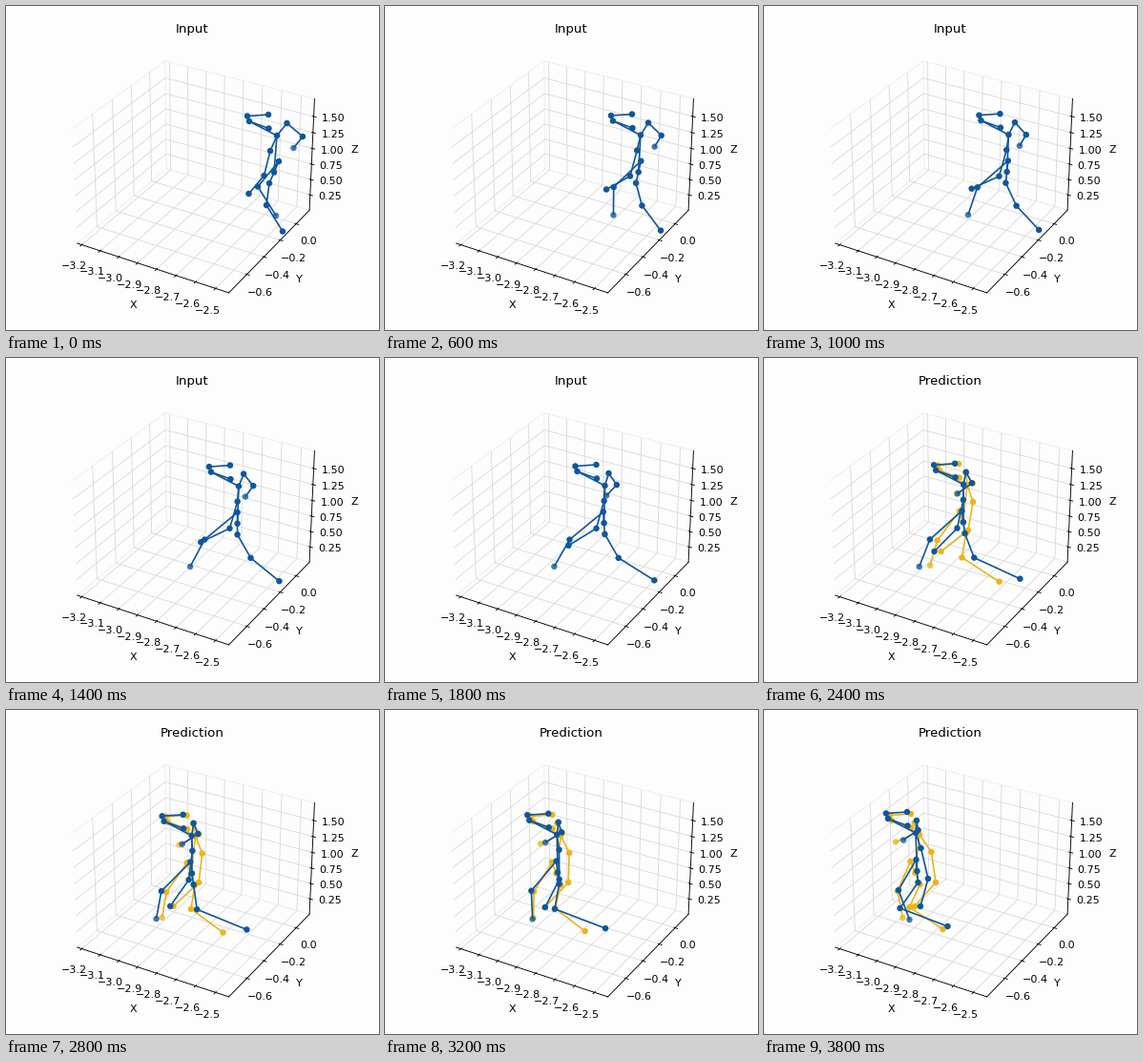
These frames come from a looping animation (391 px wide and 340 px high, 4000 ms). A matplotlib script:

```python
import numpy as np
import matplotlib.pyplot as plt
from matplotlib.animation import FuncAnimation
from matplotlib.collections import LineCollection
from matplotlib.colors import to_rgba

W, H, DPI = 391, 340, 80
FRAMES, STEP = 20, 200
PAPER, BLUE, YELLOW = "#fdfdfd", "#10569c", "#ebb51a"
SWITCH, LAST = 2000, 3800          # first predicted pose, last pose (ms)
MISS_FROM = 2200                   # reference time of the prediction error


def arc(u, start, end, swing=0, lag=0):
    """Straight drift plus one stride of swing; lag skews its timing."""
    return (start + (end - start) * u
            + swing * np.sin(np.pi * u) + lag * np.sin(2 * np.pi * u))


# Stage points are complex numbers in pixels, y pointing down.
# Each motion is a set of arc() arguments, followed by the prediction's error.
NECK = (284 + 136j, 159 + 129j, 5.5 + 1.3j, 1.3), (4, 4 + 2j)
HEAD = {"chin": -29 - 15j, "brow": -31 - 20.5j,
        "crown": -9 - 22j, "nape": -8.5 - 7.5j}
PELVIS = (-3 + 38.5j, 1.5 + 40j), (-4.5, -6)
HIP_TILT = (5 - 11.5j, -1 - 12j, -3), (-1.5, -4)
LIMBS = {  # relative to the neck
    "r_shoulder": ((10.5 - 13j, 1 - 13j, -2), (-4, -6)),
    "r_elbow": ((27 + 1j, 2.5 - 3j, -3), (-3, -4)),
    "r_hand": ((17.5 + 13j, -13 + 7.5j, -2, 3.5), (-4, -12)),
    "l_shoulder": ((-7 + 16j, 5.5 + 16j, 0, 1.5), (6 + 2j, 7 + 2j)),
    "l_elbow": ((-13.5 + 42j, 13 + 48j, -8.5, 2.8), (8 + 2j, 4 + 2j)),
    "l_hand": ((-29.5 + 61j, 5 + 77j, -25 - 5j, -5j), (5, -10 - 2j)),
    "l_knee": ((-11 + 73j, -16.5 + 79j, 28), (-20, 6 - 3j)),
    "l_foot": ((6 + 100.5j, 33.5 + 98j, 34, -6.5), (-23 + 3j, -9 + 1j, -12)),
    "r_knee": ((-20 + 53.5j, -18 + 60j, -18), (5 + 1j, -5 - 1j)),
    "r_foot": ((-1 + 84j, -6.5 + 91j, -49 - 2.5j, -4), (10 - 1j, -11 - 4j)),
}
CHAINS = (
    ("neck", "chin", "brow", "crown"),
    ("chin", "nape"),
    ("neck", "r_shoulder", "r_elbow", "r_hand"),
    ("neck", "l_shoulder", "l_elbow", "l_hand"),
    ("neck", "pelvis"),
    ("pelvis", "r_hip", "r_knee", "r_foot"),
    ("pelvis", "l_hip", "l_knee", "l_foot"),
)
NAMES = list(dict.fromkeys(name for chain in CHAINS for name in chain))
FAINT = {"r_foot", "r_hand"}       # far side of the body


def pose(t, predicted):
    u, v = t / LAST, (t - MISS_FROM) / (LAST - MISS_FROM)

    def place(track):
        motion, miss = track
        return arc(u, *motion) + (arc(v, *miss) if predicted else 0)

    neck = place(NECK)
    pelvis, tilt = neck + place(PELVIS), place(HIP_TILT)
    pts = {"neck": neck, "pelvis": pelvis,
           "r_hip": pelvis + tilt, "l_hip": pelvis - tilt}
    pts.update((name, neck + offset) for name, offset in HEAD.items())
    pts.update((name, neck + place(track)) for name, track in LIMBS.items())
    return {name: (p.real, p.imag) for name, p in pts.items()}


class Skeleton:
    def __init__(self, ax, color, predicted, z):
        self.predicted = predicted
        self.bones = LineCollection([], colors=color, linewidths=1.5, zorder=z)
        ax.add_collection(self.bones, autolim=False)
        tints = [to_rgba(color, 0.78 if n in FAINT else 1) for n in NAMES]
        self.dots = ax.scatter([0] * len(NAMES), [0] * len(NAMES), s=34,
                               c=tints, linewidths=0, zorder=z + 1)

    def update(self, t):
        pts = pose(t, self.predicted)
        self.bones.set_segments([[pts[n] for n in chain] for chain in CHAINS])
        self.dots.set_offsets([pts[n] for n in NAMES])

    def show(self, on):
        self.bones.set_visible(on)
        self.dots.set_visible(on)


plt.rcParams.update({"font.family": "DejaVu Sans", "font.size": 10,
                     "grid.color": "#dadada", "grid.linewidth": 0.8})
fig = plt.figure(figsize=(W / DPI, H / DPI), dpi=DPI, facecolor=PAPER)

# Room: a square 3D axes with the default camera.
SIDE, LEFT, BOTTOM = 283, 53.3, 21.2
room = fig.add_axes([LEFT / W, BOTTOM / H, SIDE / W, SIDE / H],
                    projection="3d", facecolor="none")
room.set(xlim=(-3.225, -2.433), ylim=(-0.803, 0.174), zlim=(-0.002, 1.770))
room.set_xticks(np.arange(-3.2, -2.45, 0.1))
room.set_yticks(np.arange(-3, 1) / 5)
room.set_zticks(np.arange(0.25, 1.6, 0.25))
room.xaxis.set_major_formatter(lambda v, _: f"{v:.1f}".replace("-", "\u2212"))
room.set(xlabel="X", ylabel="Y", zlabel="Z")
for axis in (room.xaxis, room.yaxis, room.zaxis):
    axis.set_pane_color((0.94, 0.94, 0.94, 1))
    axis.pane.set_fill(False)

# Stage: flat pixel space for the moving figures.
stage = fig.add_axes([0, 0, 1, 1], facecolor="none")
stage.set(xlim=(0, W), ylim=(H, 0))
stage.axis("off")
title = stage.text(194.7, 28, "Input", fontsize=12, ha="center", va="baseline")
guess = Skeleton(stage, YELLOW, True, 2)
truth = Skeleton(stage, BLUE, False, 4)


def update(i):
    t = i * STEP
    predicting = t >= SWITCH
    title.set_text("Prediction" if predicting else "Input")
    truth.update(t)
    guess.update(t)
    guess.show(predicting)
    return []


anim = FuncAnimation(fig, update, frames=FRAMES, interval=STEP,
                     init_func=lambda: update(0), repeat=True, repeat_delay=0)
plt.show()
```
